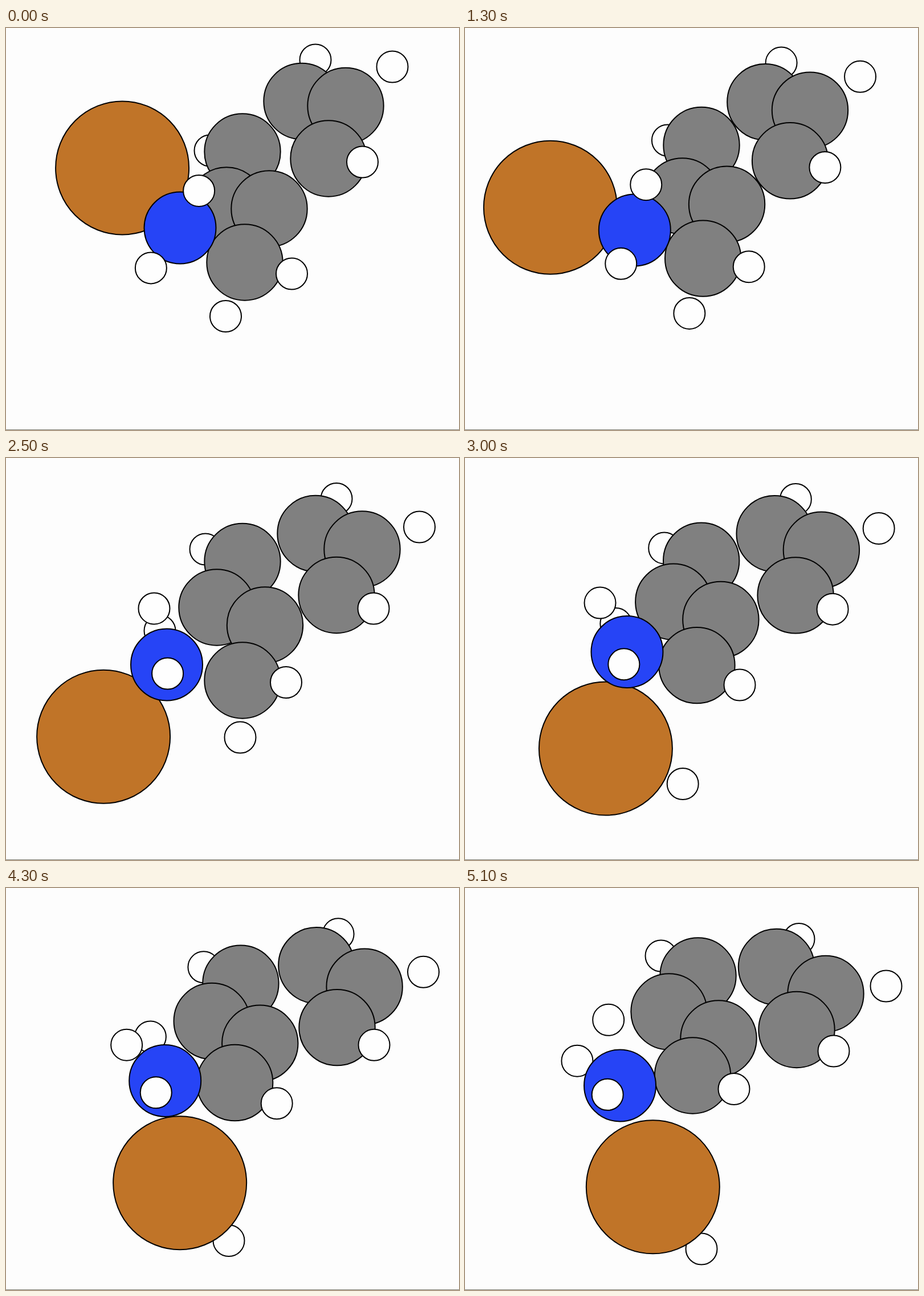
Write an HTML page that moves like this. It is 795 px wide and 705 px high and loops after 5200 ms.

```html
<!DOCTYPE html>
<html lang="en">
<head>
<meta charset="utf-8">
<title>Molecule</title>
<style>
html, body { margin: 0; width: 100%; height: 100%; overflow: hidden; background: #fdfdfd; }
svg { display: block; width: 795px; height: 705px; }
circle { stroke: #000; stroke-width: 2; }
</style>
</head>
<body>
<svg viewBox="0 0 795 705">
  <g id="atoms"></g>
  <rect y="704" width="795" height="1" fill="#7c7c72"/>
</svg>
<script>
const LOOP = 5200, STEP = 100;
// The reaction peaks, the new bonds settle, the fragments drift apart
const PEAK = 2500, SETTLE = 3600, END = 5100, FLIP = 4300;
const KINDS = {
  H: [27.5, '#fefefe'],
  C: [66.7, '#808080'],
  N: [63, '#2644f6'],
  Br: [117, '#c07428']
};
const layer = document.getElementById('atoms');
const atoms = [];

const approach = u => 0.6 * u + 0.4 * u ** 5;
const snap = u => 1 - (1 - u) ** 2;
const drift = u => u ** 1.8;
const steady = u => u;

const SLOW = [[0, PEAK, approach], [PEAK, END, drift]];
const FAST = [[0, PEAK, approach], [PEAK, SETTLE, snap], [SETTLE, END, steady]];

// Three points make a slow track, four a fast one
function track(...points) {
  const legs = points.length === 3 ? SLOW : FAST;
  return t => {
    const i = Math.max(0, legs.findIndex(leg => t <= leg[1]));
    const [from, to, ease] = legs[i];
    const k = ease((t - from) / (to - from));
    return points[i].map((v, j) => v + (points[i + 1][j] - v) * k);
  };
}

// Circling a moving centre; each point is [degrees, distance]
function orbit(centre, ...points) {
  const polar = track(...points);
  return t => {
    const [x, y] = centre(t), [deg, r] = polar(t), a = deg * Math.PI / 180;
    return [x + r * Math.cos(a), y + r * Math.sin(a)];
  };
}

// Atoms are added from back to front
function atom(kind, place) {
  const el = document.createElementNS('http://www.w3.org/2000/svg', 'circle');
  const [r, fill] = KINDS[kind];
  el.setAttribute('r', r);
  el.setAttribute('fill', fill);
  layer.append(el);
  atoms.push({ el, place });
  return el;
}

const core = track([305.5, 350.5], [282, 362.5], [285.5, 330.5], [272, 346.5]);

// Right-hand group
atom('H', track([543, 56], [580, 71.5], [586, 89.5]));
atom('H', track([678, 68], [725.5, 121], [739, 172]));
atom('C', track([519, 128.5], [543, 132.5], [546.5, 138.5]));
atom('C', track([596, 136.5], [625, 160], [633, 185.5]));
atom('C', track([566, 229], [580, 240.5], [582, 248.5]));
atom('H', track([625.5, 235], [645, 264], [647, 286]));

// Hydrogen that leaves with the bromine
atom('H', track([385.5, 505.5], [411, 490], [370, 606], [415, 633]));
atom('Br', orbit(core, [226, 146], [131.3, 168], [90.3, 176], [72, 187]));

// Middle carbons
atom('H', track([358, 215], [350, 160], [344, 119]));
atom('C', track([415, 217], [415, 181.5], [409, 154]));
atom('C', track([387, 311], [370, 262], [364, 248], [358, 217]));
atom('C', track([462, 317], [454.5, 293], [446.5, 279.5], [445, 264]));
atom('C', track([419, 411], [415, 390], [403.5, 352.5], [399.5, 329]));
atom('H', track([501.5, 431], [491.5, 393.5], [478, 400], [472, 352.5]));

// Nitrogen and its hydrogens
atom('H', orbit(core, [270, 5], [258.6, 60.7], [244, 50], [260, 117]));
const nitrogen = atom('N', core);
atom('H', orbit(core, [126, 87], [84, 15.6], [113, 25.5], [144, 27]));
const swing = atom('H', orbit(core, [297, 73], [257.4, 101], [234.2, 97], [210, 86.7]));

function draw(t) {
  for (const { el, place } of atoms) {
    const [x, y] = place(t);
    el.setAttribute('cx', x.toFixed(2));
    el.setAttribute('cy', y.toFixed(2));
  }
  // The swinging hydrogen ends up behind the nitrogen
  layer.insertBefore(swing, t >= FLIP ? nitrogen : null);
}

const start = performance.now();
function tick() {
  const t = (performance.now() - start) % LOOP;
  draw(Math.floor(t / STEP) * STEP);
  requestAnimationFrame(tick);
}
tick();
</script>
</body>
</html>
```
